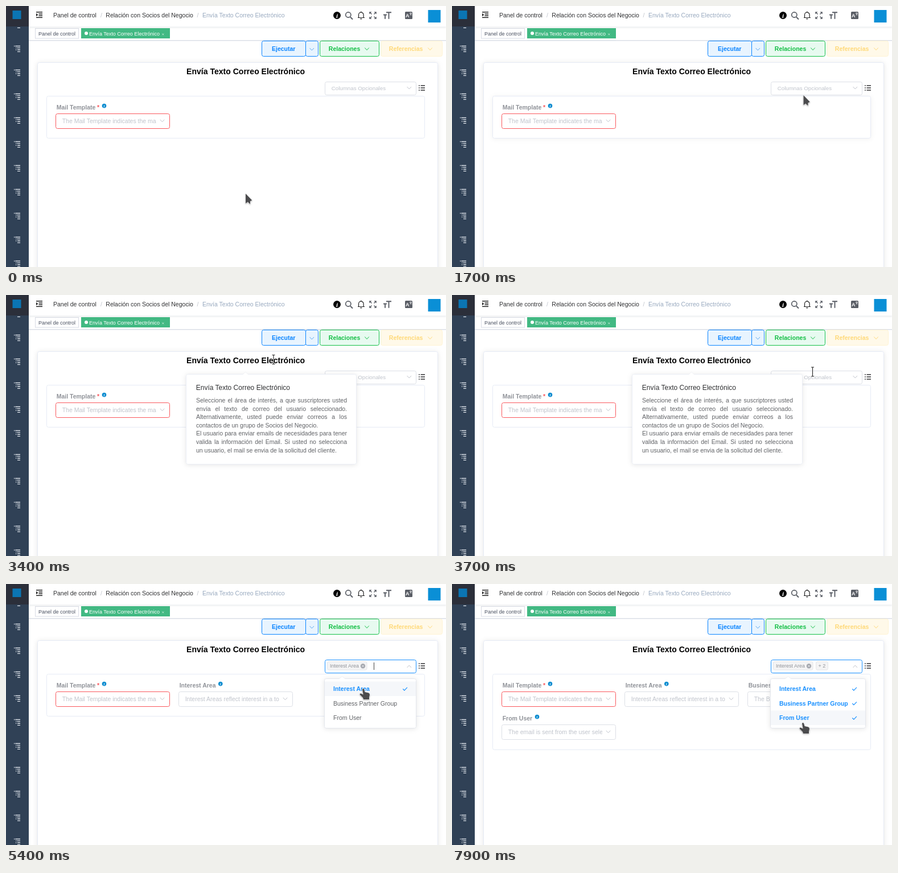
Write an HTML page that moves like this. It is 773x459 px and loops after 8 s.

```html
<!DOCTYPE html>
<html lang="es">
<head>
<meta charset="utf-8">
<title>Panel de control</title>
<style>
html, body { margin: 0; width: 100%; height: 100%; overflow: hidden; background: #fff; }
svg { display: block; width: 100vw; height: 100vh; font-family: "Liberation Sans", Arial, sans-serif; }
text { white-space: pre; }
.shadow { filter: drop-shadow(0 1.5px 4.5px rgba(0,0,0,.1)); }
.faint { filter: drop-shadow(0 1.5px 4px rgba(0,0,0,.06)); }
.help { font: 10.5px/14.6px "Liberation Sans", Arial, sans-serif; color: #606266; text-align: justify; }
</style>
</head>
<body>
<svg id="stage" viewBox="0 0 773 459" preserveAspectRatio="none"></svg>
<script>
const LOOP = 8000, STEP = 100;
const BLUE = '#1890ff', GREY = '#c0c4cc', LINE = '#dcdfe6', INK = '#303133', DARK = '#4b4b4d';
const RUN = '#0a84ff', GREEN = '#13bf45', RED = '#f9575c', ICON = '#5a5e66';

const text = (x, y, size, str, fill, more = '') =>
  `<text x="${x}" y="${y}" font-size="${size}" fill="${fill}" ${more}>${str}</text>`;
const bold = (x, y, size, str, fill, more = '') => text(x, y, size, str, fill, 'font-weight="700" ' + more);
const rect = (x, y, w, h, fill, more = '') =>
  `<rect x="${x}" y="${y}" width="${w}" height="${h}" fill="${fill}" ${more}/>`;
const box = (x, y, w, h, fill, stroke, r = 3, more = '') =>
  rect(x + .5, y + .5, w - 1, h - 1, fill, `stroke="${stroke}" rx="${r}" ${more}`);
const line = (d, stroke, width = 1, more = '') =>
  `<path d="${d}" fill="none" stroke="${stroke}" stroke-width="${width}" ${more}/>`;
const group = (id, body, more = '') => `<g id="${id}" ${more}>${body}</g>`;
const chevron = (x, y, color, dir = 1, more = '') =>
  line(`M${x - 3.7} ${y - 2 * dir}L${x} ${y + 2 * dir}L${x + 3.7} ${y - 2 * dir}`, color, 1, more);
const info = (x, y, r, fill) => `<circle cx="${x}" cy="${y}" r="${r}" fill="${fill}"/>` +
  `<text x="${x}" y="${y + r * .62}" font-family="Liberation Serif, serif" font-style="italic" font-weight="700"
    font-size="${r * 1.75}" fill="#fff" text-anchor="middle">i</text>`;

function sidebar() {
  let s = rect(0, 0, 40, 459, '#304156');
  for (let i = 0; i < 11; i++) {
    const y = 33.5 + 42 * i;
    s += line(`M14 ${y - 5}h1.3m1 0h8.7M17 ${y - 1.8}h1.3m1 0h5.7M20 ${y + 1.5}h5M17 ${y + 1.5}h1.3M20 ${y + 4.8}h5`, '#dde3ea', 1.3);
  }
  return s + rect(0, 0, 40, 36, '#2b2f3a') + rect(11.5, 8, 15, 15, '#0b75b3');
}

function expandIcon(x, y) {
  const corner = [[-1, -1], [1, -1], [-1, 1], [1, 1]].map(([sx, sy]) =>
    `<g transform="translate(${x} ${y}) scale(${sx} ${sy})"><path d="M6.3 6.3H2L6.3 2Z" fill="${ICON}"/>` +
    line('M2 2L5 5', ICON, 1.4) + '</g>');
  return corner.join('');
}

function navbar() {
  const crumb = (x, str, fill = INK) => text(x, 20, 10.5, str, fill);
  return rect(40, 0, 733, 36.5, '#fff', 'style="filter:drop-shadow(0 1px 1.5px rgba(0,21,41,.12))"') +
    line('M53 10.7h11M57.5 14h6.5M57.5 17h6.5M53 20.3h11', '#222', 1.4) +
    '<path d="M53 12.8L56.3 15.5L53 18.2Z" fill="#222"/>' +
    crumb(83, 'Panel de control') + crumb(166, '/', GREY) +
    crumb(175.3, 'Relación con Socios del Negocio') + crumb(335.5, '/', GREY) +
    crumb(345, 'Envía Texto Correo Electrónico', '#97a8be') +
    info(581.5, 16.5, 6.5, '#000') +
    line('M605 19.5L609 23.5', ICON, 2) +
    `<circle cx="601.3" cy="15.5" r="4.6" fill="none" stroke="${ICON}" stroke-width="1.7"/>` +
    line('M618 20.5h12M619.5 20V15.5a4.3 4.3 0 0 1 8.6 0V20M623.8 9.5v1.5M622.3 22.6h3', '#222', 1.2) +
    expandIcon(644.5, 16.5) +
    line('M668 11.3h9M672.5 11.3V22.8M663 15.5h6M666 15.5V22.8', ICON, 1.9) +
    rect(701, 10, 13, 13, ICON, 'rx="1.5"') + bold(702, 20.3, 9, 'A', '#fff') +
    line('M709 12.6h4M711 11.6v1M709.6 16.4l3-3.4M709.8 13.4l2.8 3', '#fff', .8) +
    rect(741.5, 7, 22, 22, '#0a8fd6');
}

function tabs() {
  return rect(40, 37, 733, 23, '#fff') + rect(40, 60, 733, 1, '#d8dce5') + rect(40, 61, 733, 1, '#f0f2f5') +
    box(51, 39, 77, 18.5, '#fff', '#d8dce5', 0) + text(57, 52, 9, 'Panel de control', '#495060') +
    rect(132, 39, 156, 18, '#42b983') + '<circle cx="141" cy="48" r="3" fill="#fff"/>' +
    text(146, 52, 9, 'Envía Texto Correo Electrónico', '#fff') +
    line('M274.3 48.3l3 3m0-3l-3 3', '#cdeedd', .8);
}

function buttons() {
  return box(449, 61, 78, 28, '#e8f4ff', RUN) + box(526, 61, 23, 28, '#e8f4ff', RUN) +
    bold(467, 79, 10.5, 'Ejecutar', RUN) + chevron(537.3, 76, '#5ea9f0') +
    box(551, 61, 105, 28, '#e7faf0', GREEN) + bold(566.8, 79, 10.5, 'Relaciones', GREEN) +
    chevron(634, 75.5, GREEN) +
    box(658, 61, 109, 28, '#fff9e9', '#fff3d3') + bold(672.8, 79, 10.5, 'Referencias', '#ffd978') +
    chevron(745, 75.5, '#ffd978');
}

function field(x, y, label, hint, iconX, border = LINE, star = '') {
  return bold(x + 1.7, y - 7, 10.5, label, '#909399') + star + info(iconX, y - 13.4, 3.8, '#0a8cd0') +
    box(x, y, 201, 27, '#fff', border) +
    `<svg x="${x}" y="${y}" width="177" height="27">${text(11.7, 17, 10.5, hint, GREY)}</svg>` +
    chevron(x + 187.5, y + 12.8, GREY);
}

function selector() {
  const tag = (x, w) => box(x, 136, w, 15.5, '#f4f4f5', '#e4e5e8', 2.5);
  return box(560, 133, 161, 24, '#fff', LINE, 3, 'id="selBox"') +
    text(571.7, 148, 9.75, 'Columnas Opcionales', GREY, 'id="selHint"') +
    group('tags', tag(564, 70.5) + text(569, 147, 9, 'Interest Area', '#909399') +
      '<circle cx="627" cy="144.3" r="4.2" fill="#a6a9b0"/>' +
      line('M625.4 142.7l3.2 3.2m0-3.2l-3.2 3.2', '#f4f4f5', .9)) +
    group('more', tag(639, 22) + text(643.5, 147, 9, '', '#909399', 'id="count"')) +
    chevron(708.3, 144, GREY, 1, 'id="down"') + chevron(708.3, 145, GREY, -1, 'id="up"') +
    rect(0, 138, 1, 13, '#444', 'id="caret"') +
    line('M728.5 140h7.5M728.5 144h7.5M728.5 148h7.5M725 140h1.8M725 144h1.8M725 148h1.8', INK, 1.4);
}

const OPTIONS = ['Interest Area', 'Business Partner Group', 'From User'];

function dropdown() {
  return box(559, 166, 162, 88, '#fff', '#e4e7ed', 3, 'id="menu" class="shadow"') +
    '<path d="M585.5 167L590.5 162.5L595.5 167Z" fill="#fff"/>' +
    line('M585.5 166.5L590.5 162.5L595.5 166.5', '#eceef3', .8) +
    rect(560, 0, 160, 25.5, '#f5f7fa', 'id="hover"') +
    OPTIONS.map((name, i) => text(575, 188 + 25.5 * i, 10.5, name, '#606266', `id="opt${i}"`) +
      line(`M-3.7 ${184.5 + 25.5 * i}l2.6 2.6l5-5.2`, BLUE, 1.2, `id="chk${i}"`)).join('');
}

function popover() {
  return box(316, 139, 300, 159, '#fff', '#ebeef5', 3, 'class="shadow"') +
    '<path d="M416 140L420.7 135.5L425.5 140Z" fill="#fff"/>' +
    line('M416 139.5L420.7 135.5L425.5 139.5', '#eceef3', .7) +
    text(333.8, 167, 12, 'Envía Texto Correo Electrónico', INK) +
    `<foreignObject x="334" y="178" width="265" height="112"><div class="help">Seleccione el área de interés,
    a que suscriptores usted envía el texto de correo del usuario seleccionado. Alternativamente, usted puede
    enviar correos a los contactos de un grupo de Socios del Negocio.<br>El usuario para enviar emails de
    necesidades para tener valida la información del Email. Si usted no selecciona un usuario, el mail se
    envia de la solicitud del cliente.</div></foreignObject>`;
}

const SHAPES = {
  arrow: 'M0 0V17.2L3.7 14.4L8 18.6V13.2L11.3 11.8Z',
  hand: 'M-2 1.5Q-.8 -1 1 1L2.5 6L9 7.4Q11 8.3 11 11L10 15.5V19H0L-1 16L-6.2 10.8Q-7 8.2 -4 8.7L-.4 10.5Z'
};
const BEAM = 'M-2.5 -8.5H2.5M0 -8.5V7.5M-2.5 7.5H2.5';
const cursors = () => Object.entries(SHAPES).map(([id, d]) =>
  `<path id="${id}" d="${d}" fill="${DARK}" stroke="#fff" stroke-width="1" paint-order="stroke"
    style="filter:drop-shadow(.5px 1px 1px rgba(0,0,0,.3))"/>`).join('') +
  group('beam', line(BEAM, '#fff', 2) + line(BEAM, '#222', 1.1));

const stage = document.getElementById('stage');
stage.innerHTML = rect(0, 0, 773, 459, '#fff') + tabs() + navbar() + buttons() +
  box(55, 99, 704, 400, '#fff', '#e6ebf5', 3, 'class="shadow"') + sidebar() +
  bold(317.1, 120, 14.04, 'Envía Texto Correo Electrónico', '#000') +
  box(71, 158, 665, 75, '#fff', '#e6ebf5', 3, 'id="card"') + selector() +
  field(87, 189, 'Mail Template', 'The Mail Template indicates the ma', 172.5, RED, bold(160, 182, 10.5, '*', RED)) +
  group('field0', field(303, 189, OPTIONS[0], 'Interest Areas reflect interest in a to', 376.8)) +
  group('field1', field(519, 189, OPTIONS[1], 'The Business Partner Group', 650)) +
  group('field2', field(87, 247, OPTIONS[2], 'The email is sent from the user sele', 149.5)) +
  group('drop', dropdown()) + group('pop', popover()) + group('cursor', cursors());

const el = {};
stage.querySelectorAll('[id]').forEach(n => el[n.id] = n);
const set = (id, attrs) => { for (const k in attrs) el[id].setAttribute(k, attrs[k]); };
const show = (id, on) => set(id, { display: on ? 'inline' : 'none' });
const within = (t, a, b) => t >= a && t < b;

// time, x, y of the pointer's hot spot
const PATH = [
  [0, 421, 330], [500, 502, 262], [600, 502, 262], [1000, 675, 199], [1100, 675, 199],
  [1300, 735, 175], [1400, 742, 120], [1500, 680, 85], [1600, 566, 120], [1700, 617.5, 157],
  [2000, 650, 128], [2200, 669, 142], [2300, 669, 142], [2400, 668.5, 143], [2500, 668.5, 143],
  [2600, 667.5, 143], [2700, 667.5, 143], [2900, 669, 138], [3000, 669, 138], [3300, 480, 113],
  [3400, 470, 114], [3700, 633.5, 135.5], [3900, 632, 142], [4000, 631.5, 143], [4300, 631.5, 143],
  [4700, 628, 184], [5500, 628, 184], [5800, 627.5, 208], [6300, 627.5, 208], [6400, 627.5, 221],
  [6500, 623, 225], [7500, 623, 225], [7600, 621, 228], [7700, 621, 228], [7900, 617, 244], [8000, 617, 244]
];
// start, end, x of the visible caret
const CARET = [[4200, 4800, 571], [5400, 6000, 646], [6400, 6900, 672], [7100, 7800, 672]];
const PICKS = [5400, 6400, 7100];

function pointer(t) {
  const i = PATH.findIndex(p => p[0] > t);
  const [a, b] = [PATH[i - 1], PATH[i]], k = (t - a[0]) / (b[0] - a[0]);
  return [a[1] + (b[1] - a[1]) * k, a[2] + (b[2] - a[2]) * k];
}

function draw(t) {
  const open = t >= 4200, picked = PICKS.filter(p => t >= p).length;
  const [x, y] = pointer(t);
  const shape = t < 2100 ? 'arrow' : t < 4500 ? 'beam' : 'hand';
  set('cursor', { transform: `translate(${x} ${y})` });
  ['arrow', 'beam', 'hand'].forEach(id => show(id, id === shape));

  set('card', { height: picked > 2 ? 133 : 74, class: within(t, 800, 1800) ? 'faint' : '' });
  set('selBox', { stroke: open ? BLUE : within(t, 2100, 3100) || within(t, 3900, 4200) ? GREY : LINE });
  show('down', !open);
  show('up', open);
  show('selHint', !picked);
  show('tags', picked);
  show('more', picked > 1);
  el.count.textContent = '+ ' + (picked - 1);
  const caret = CARET.find(c => within(t, c[0], c[1]));
  show('caret', caret);
  if (caret) set('caret', { x: caret[2] });

  const grow = t < 4300 ? .8 : t < 4400 ? .97 : 1;
  const right = picked > 1 ? 727 : 721;
  show('drop', open);
  set('drop', { opacity: t < 4300 ? .6 : 1, transform: `translate(0 ${166.5 * (1 - grow)}) scale(1 ${grow})` });
  set('menu', { width: right - 560 });
  const row = t < 4600 ? -1 : t < 5700 ? 0 : t < 6500 ? 1 : 2;
  show('hover', row >= 0);
  set('hover', { y: 171.5 + 25.5 * row, width: right - 561 });
  OPTIONS.forEach((_, i) => {
    const on = i < picked;
    show('field' + i, on);
    show('chk' + i, on);
    set('chk' + i, { transform: `translate(${right - 20} 0)` });
    set('opt' + i, { fill: on ? BLUE : '#606266', 'font-weight': on ? 700 : 400 });
  });

  show('pop', within(t, 3300, 3900));
  set('pop', { opacity: t < 3400 ? .5 : t < 3800 ? 1 : .4 });
}

function tick() {
  const t = performance.now() % LOOP;
  draw(Math.floor(t / STEP) * STEP);
  requestAnimationFrame(tick);
}
tick();
</script>
</body>
</html>
```
